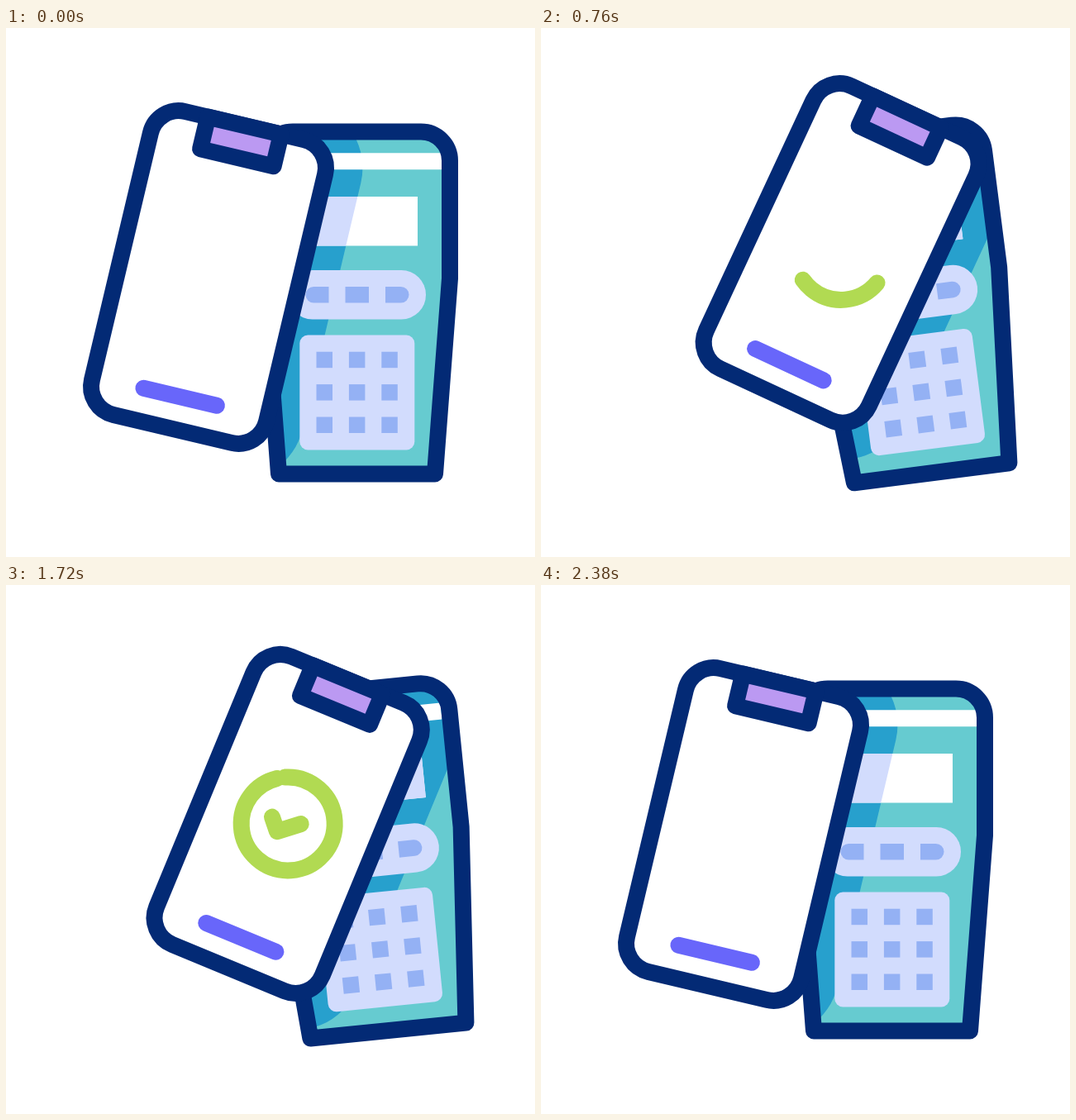
Write an HTML page with a canvas that moves like this. It is 640 px wide and 640 px high and loops after 2400 ms.

```html
<!DOCTYPE html>
<html lang="en">
<head>
<meta charset="utf-8">
<title>Phone payment</title>
<style>
  html, body { margin: 0; height: 100%; overflow: hidden; background: #fff; }
  canvas { display: block; }
</style>
</head>
<body>
<canvas id="stage" width="640" height="640"></canvas>
<script>
const ctx = document.getElementById('stage').getContext('2d');
const LOOP = 2400, RAD = Math.PI / 180;
const NAVY = '#032a75', TEAL = '#66cbd0', SHADE = '#27a0cd', PALE = '#d2dcfd',
      KEY = '#94b1f4', GREEN = '#b1da52', PURPLE = '#6866fa', LILAC = '#bb99f2';

const clamp = x => Math.min(1, Math.max(0, x));

// cubic-bezier(.7, 0, .3, 1), solved by bisection
function ease(x) {
  x = clamp(x);
  let lo = 0, hi = 1;
  for (let i = 0; i < 24; i++) {
    const s = (lo + hi) / 2, r = 1 - s;
    if (2.1 * s * r * r + 0.9 * s * s * r + s * s * s < x) lo = s; else hi = s;
  }
  return lo * lo * (3 - 2 * lo);
}

function roundRect(x, y, w, h, r) {
  const p = new Path2D();
  p.roundRect(x, y, w, h, r);
  return p;
}

const body = new Path2D('M330 539.5H519L537 303V160.5A35 35 0 0 0 502 125.5H347A35 35 0 0 0 312 160.5V303Z');
const phone = roundRect(-108.5, -188.5, 217, 377, 35);
const notch = roundRect(-45.5, -188.5, 91, 39.8, 0);
const bar = new Path2D('M-45.5 148.7H45.5');
const tick = new Path2D('M-20.9 -.3L-8.7 13.6L17.7 -8.4');
const TICK_LENGTH = 52.9;

function fill(path, color) {
  ctx.fillStyle = color;
  ctx.fill(path);
}

function stroke(path, color, width = 20) {
  ctx.strokeStyle = color;
  ctx.lineWidth = width;
  ctx.stroke(path);
}

function within(place, draw) {
  ctx.save();
  place();
  draw();
  ctx.restore();
}

function castShadow(area, color, placePhone) {
  within(() => ctx.clip(area), () => {
    placePhone();
    fill(phone, color);
    stroke(phone, color, 89);
  });
}

function drawTerminal(placeTerminal, placePhone) {
  within(placeTerminal, () => {
    const screen = roundRect(351, 204, 147, 59.5, 0);
    fill(body, TEAL);
    castShadow(body, SHADE, placePhone);
    fill(roundRect(322, 151.3, 205, 20, 0), '#fff');
    fill(screen, '#fff');
    castShadow(screen, PALE, placePhone);

    fill(roundRect(341, 293, 167, 59.5, 29.75), PALE);
    fill(roundRect(362.5, 313, 28, 19.5, [9.75, 0, 0, 9.75]), KEY);
    fill(roundRect(410.5, 313, 28.5, 19.5, 0), KEY);
    fill(roundRect(459, 313, 28.5, 19.5, [0, 9.75, 9.75, 0]), KEY);

    fill(roundRect(355.3, 371.5, 139, 139, 10), PALE);
    for (let i = 0; i < 9; i++)
      fill(roundRect(375.5 + i % 3 * 39.4, 391.7 + Math.floor(i / 3) * 39.4, 19.5, 19.5, 0), KEY);
    stroke(body, NAVY);
  });
}

function drawRing(t) {
  const grow = ease((t - 430) / 770);
  const gap = clamp((t - 1612) / 656) ** 2;
  if (grow <= 0 || gap >= 1) return;
  let from = 67.5 - 180 * grow, to = 67.5 + 180 * grow;
  if (gap > 0) {
    from = -112.5 - 130 * gap;
    to = 247.5 - 490 * gap;
  }
  const ring = new Path2D();
  ring.arc(0, 0, 56.5, from * RAD, to * RAD);
  stroke(ring, GREEN);
}

function drawTick(t) {
  const part = ease((t - 800) / 500) - ease((t - 1580) / 510);
  if (part <= 0.001) return;
  ctx.setLineDash([TICK_LENGTH * part, 100]);
  stroke(tick, GREEN);
  ctx.setLineDash([]);
}

function drawPhone(placePhone, t) {
  within(placePhone, () => {
    fill(phone, '#fff');
    stroke(phone, NAVY);
    fill(notch, LILAC);
    stroke(notch, NAVY);
    stroke(bar, PURPLE);
    drawRing(t);
    drawTick(t);
  });
}

function render(now) {
  const t = now % LOOP;
  const u = Math.min(ease(t / 1190), 1 - ease((t - 1181) / 1200));

  const placeTerminal = () => {
    ctx.translate(439, 162);
    ctx.rotate(-8.77 * u * RAD);
    ctx.translate(-439, -162);
  };
  const placePhone = () => {
    ctx.resetTransform();
    ctx.translate(245 + u * (165 - 28 * u), 301.5 + u * (54 - 130 * u + 28 * u * u));
    ctx.rotate((13.35 + 13.9 * u) * RAD);
  };

  ctx.resetTransform();
  ctx.fillStyle = '#fff';
  ctx.fillRect(0, 0, 640, 640);
  ctx.lineCap = ctx.lineJoin = 'round';
  drawTerminal(placeTerminal, placePhone);
  drawPhone(placePhone, t);
}

const start = performance.now();
function animate() {
  render(performance.now() - start);
  requestAnimationFrame(animate);
}
animate();
</script>
</body>
</html>
```
